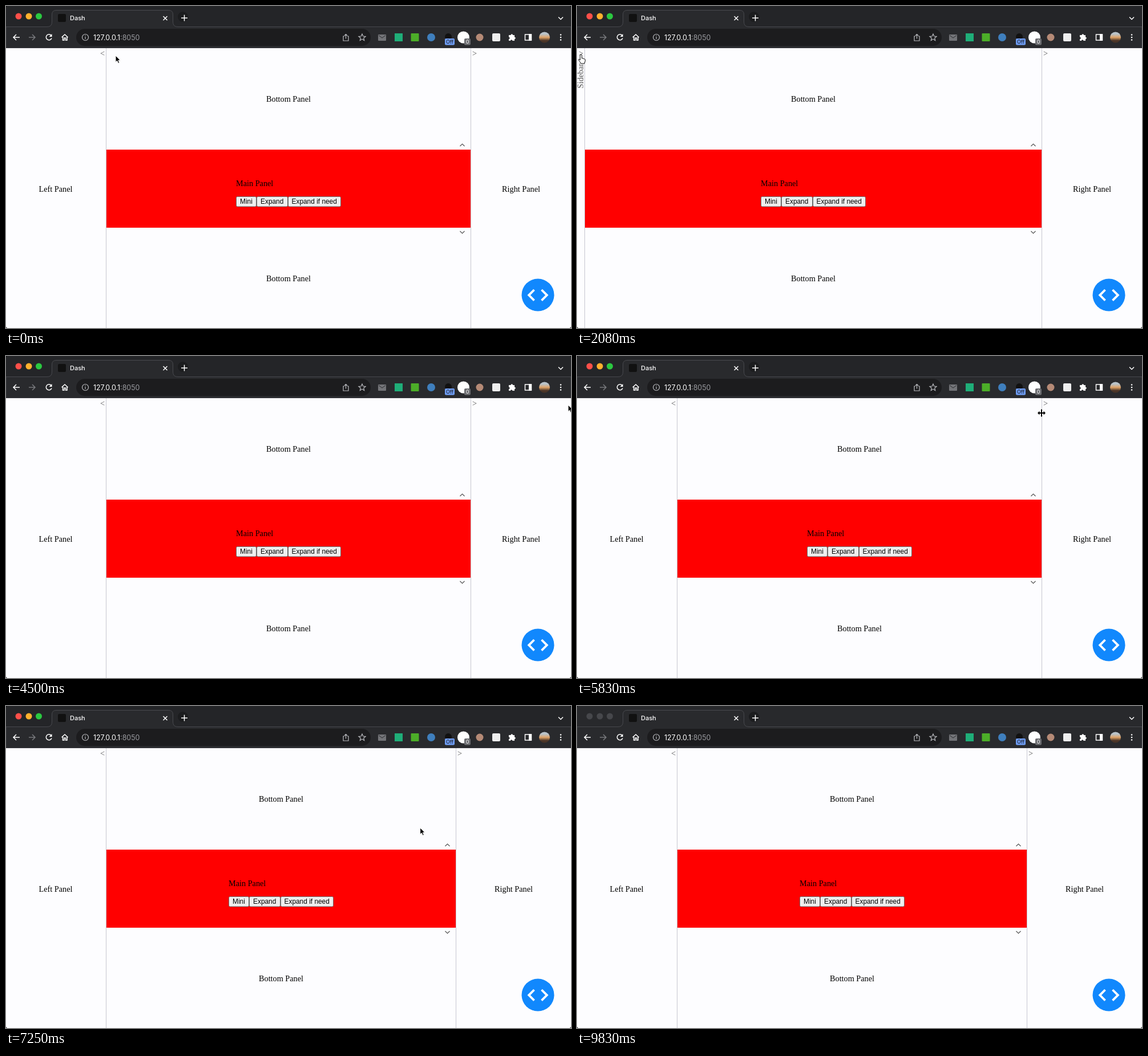
Recreate the animation shown at these times as an HTML page. Size 990 by 565 pixels, loop 9910 ms.

```html
<!DOCTYPE html>
<html lang="en">
<head>
<meta charset="utf-8">
<title>Resizable panels</title>
<style>
html, body { margin: 0; width: 100%; height: 100%; overflow: hidden; background: #000; }
svg { display: block; border-radius: 3px; }
text { white-space: pre; }
.ui { font-family: Inter, Roboto, sans-serif; fill: #fff; }
.page { font: 14.25px "Liberation Serif", "Times New Roman", serif; }
.button { font: 11.9px "Liberation Sans", Arial, sans-serif; }
.button rect { fill: #efefef; stroke: #6b6b6b; }
.grey { fill: #555; }
.line { fill: none; stroke: #fff; stroke-width: 1.5; }
.chevron { fill: none; stroke: #555; stroke-width: 1.2; }
.edge { stroke: #c6c6d0; }
.middle { text-anchor: middle; }
</style>
</head>
<body>
<svg width="990" height="565" viewBox="0 0 990 565">
  <defs>
    <linearGradient id="photo" x2="0" y2="1">
      <stop offset=".2" stop-color="#b9c3c9"/><stop offset=".5" stop-color="#e0a468"/><stop offset=".8" stop-color="#4a3426"/>
    </linearGradient>
  </defs>

  <!-- Tab strip -->
  <rect id="strip" width="990" height="37"/>
  <g id="lights"><circle cx="22" cy="18" r="5.5"/><circle cx="40" cy="18" r="5.5"/><circle cx="57.500" cy="18" r="5.500"/></g>
  <path d="M0 36.500H72Q80.500 36.500 80.500 28V15Q80.500 7.500 88 7.500H285Q292.500 7.500 292.500 15V28Q292.500 36.500 301 36.500H990V74H0Z" fill="#292a2d" stroke="#48494e"/>
  <rect x="91" y="14" width="14" height="14" rx="2" fill="#111"/>
  <text class="ui" x="112" y="25" font-size="11" font-weight="500">Dash</text>
  <circle cx="310" cy="19" r="9" fill="#1b1c1e"/>
  <path class="line" d="M275.500 18l7 7m0-7l-7 7M307 21h11M312.500 15.500v11M968 19.500l4 4 4-4"/>

  <!-- Toolbar -->
  <path class="line" d="M24 55H13m5-5l-5 5 5 5M79.500 52A5 5 0 1 0 80 56.500M97.500 55l5.500-5 5.500 5M99.500 54v6h2.500v-4h2.500v4h2.500v-6"/>
  <path d="M80.500 49v5h-5z" fill="#fff"/>
  <path class="line" d="M40 55h11m-5-5l5 5-5 5" style="stroke:#77787c"/>
  <rect x="123" y="40" width="516" height="30" rx="15" fill="#1c1c1e"/>
  <g class="line" style="stroke:#bbbcc0;stroke-width:1.2">
    <circle cx="139" cy="55" r="5.500"/><path d="M139 54v4M139 51.500v1.300"/>
    <path d="M593 53h-2v8h9v-8h-2M595.500 57.500v-8m-2.500 2.500l2.500-2.500 2.500 2.500"/>
    <path d="M624 49l1.700 4 4.300.4-3.300 2.800 1 4.200-3.700-2.300-3.700 2.300 1-4.200-3.300-2.800 4.300-.4z"/>
  </g>
  <text class="ui" x="153" y="59.500" font-size="12.400">127.0.0.1<tspan fill="#9a9ba0">:8050</tspan></text>
  <rect x="652" y="50" width="14" height="11" rx="1" fill="#737478"/>
  <path d="M653 51.500l6 4.500 6-4.500" fill="none" stroke="#292a2d"/>
  <rect x="681" y="48" width="14" height="14" fill="#1fae78"/>
  <rect x="709.500" y="48" width="14" height="14" rx="1" fill="#4cae28"/>
  <circle cx="745" cy="55" r="7" fill="#3f7fbd"/>
  <circle cx="775" cy="54" r="6" fill="#111"/>
  <circle cx="801.500" cy="55" r="10.500" fill="#fff"/>
  <rect x="769" y="57" width="17" height="11.500" rx="2" fill="#6f9df5"/>
  <rect x="803" y="57" width="11" height="11.500" rx="2" fill="#6b6c70"/>
  <g class="ui middle" font-size="9"><text x="777.500" y="66" style="fill:#111">Off</text><text x="808.500" y="66">0</text></g>
  <circle cx="830" cy="55" r="6.500" fill="#b58a76"/>
  <rect x="852" y="48" width="14" height="14" rx="2" fill="#eee"/>
  <path d="M881 51h3.500a1.800 1.800 0 0 1 3.600 0H891v3.500a1.800 1.800 0 0 1 0 3.600V61h-3.500a1.800 1.800 0 0 0-3.600 0H881v-3a1.800 1.800 0 0 0 0-3.600z" fill="#fff"/>
  <path class="line" d="M909.500 50h11v10h-11z"/>
  <path d="M916 49h5v12h-5z" fill="#fff"/>
  <circle cx="943.500" cy="55" r="9.500" fill="url(#photo)"/>
  <g fill="#fff"><circle cx="972" cy="50.500" r="1.300"/><circle cx="972" cy="55" r="1.300"/><circle cx="972" cy="59.500" r="1.300"/></g>

  <!-- Page -->
  <g class="page">
    <rect y="74" width="990" height="491" fill="#fdfdff"/>
    <rect id="red" y="252" height="137" fill="#f00"/>
    <g id="main">
      <text class="middle" x="495" y="168">Bottom Panel</text>
      <text x="403" y="316">Main Panel</text>
      <g class="button">
        <rect x="403.500" y="334.500" width="35" height="17.500" rx="2"/><text x="410" y="347">Mini</text>
        <rect x="439.500" y="334.500" width="54" height="17.500" rx="2"/><text x="446" y="347">Expand</text>
        <rect x="494.500" y="334.500" width="92" height="17.500" rx="2"/><text x="500.500" y="347">Expand if need</text>
      </g>
      <text class="middle" x="495" y="483">Bottom Panel</text>
    </g>
    <g id="leftEdge">
      <path class="edge" d="M-.5 74V565"/>
      <text id="leftToggle" class="grey" x="-11" y="88"></text>
    </g>
    <g id="rightEdge">
      <path class="edge" d="M.5 74V565"/>
      <path class="chevron" d="M-18.500 246l4-4 4 4M-18.500 395l4 4 4-4"/>
      <text id="rightToggle" class="grey" x="3" y="88"></text>
    </g>
    <text id="leftName" class="middle" y="325.500">Left Panel</text>
    <text id="rightName" class="middle" y="325.500">Right Panel</text>
    <text id="leftBar" class="grey" transform="translate(11 144.500) rotate(-90)">Sidebar</text>
    <text id="rightBar" class="grey" transform="translate(988 144.500) rotate(-90)">Sidebar</text>
    <circle cx="932" cy="507" r="28.500" fill="#1188fd"/>
    <path d="M925.500 498l-9.300 9.300 9.300 9.300M938.500 498l9.300 9.300-9.300 9.300" fill="none" stroke="#fff" stroke-width="3.800"/>
  </g>

  <g id="cursor">
    <path id="arrow" d="M0 0V11.500L2.700 9.100 4.600 13.500 6.700 12.600 4.800 8.300H8.300Z" fill="#000" stroke="#fff"/>
    <path id="hand" d="M-1.600.8a1.600 1.600 0 0 1 3.200 0V6q1.200-1 2.200.4 1.500-.6 2 .7 1.800-.2 1.600 1.600 0 3-1.500 6.300h-6Q-2.400 11-4.400 8.600q0-1.800 1.600-1L-1.600 9z" fill="#fff" stroke="#000"/>
    <path id="resize" d="M-7 0l3.500-3.500V-1H-1V-6.500H1V-1H3.500V-3.500L7 0 3.500 3.500V1H1V6.500H-1V1H-3.500V3.500Z" fill="#000" stroke="#fff" stroke-width="1.400" paint-order="stroke"/>
  </g>
</svg>
<script>
const LOOP = 9910, STEP = 1000 / 12;
const $ = id => document.getElementById(id);

// Keys hold a tick (1/12 s) and values to pass through.
const pointer = [
  [0, 192, 87, 'arrow'], [4, 192, 87, 'arrow'], [9, 169, 84, 'hand'], [12, 169, 82, 'hand'], [14, 169, 81, 'arrow'],
  [16, 169, 81, 'arrow'], [18, 28, 96, 'arrow'], [20, 28, 96, 'arrow'], [24, 9, 88, 'hand'], [25, 7, 86, 'hand'],
  [28, 7, 87, 'arrow'], [30, 7, 87, 'arrow'], [31, 821, 105, 'arrow'], [33, 821, 105, 'arrow'],
  [35, 843, 98, 'arrow'], [37, 821, 87, 'hand'], [38, 821, 85, 'hand'],
  [40, 821, 84, 'arrow'], [41, 821, 83, 'arrow'], [47, 983, 89, 'hand'], [48, 985, 88, 'hand'], [49, 985, 88, 'hand'],
  [52, 985, 86, 'hand'], [54, 985, 86, 'arrow'], [65, 815, 99, 'arrow'], [66, 814, 100, 'resize'],
  [71, 814, 100, 'resize'], [75, 905, 106, 'resize'], [79, 905, 106, 'resize'], [80, 828, 108, 'resize'],
  [83, 789, 112, 'resize'], [84, 789, 112, 'resize'], [85, 789, 105, 'arrow'], [86, 789, 105, 'arrow'],
  [89, 599, 431, 'arrow'], [92, 599, 431, 'arrow'], [96, 704, 408, 'arrow'], [101, 704, 408, 'arrow'],
  [102, 855, 475, 'arrow'], [104, 920, 512, 'hand'], [107, 940, 540, 'arrow'], [108, 943, 542, 'arrow']
];
const drag = [[71, 814], [75, 903], [79, 903], [80, 847], [83, 788]];

function sample(keys, n) {
  let i = keys.findIndex(key => key[0] > n);
  if (i < 0) i = keys.length;
  const a = keys[Math.max(i - 1, 0)], b = keys[Math.min(i, keys.length - 1)];
  const u = b[0] > a[0] ? (n - a[0]) / (b[0] - a[0]) : 0;
  return a.slice(1).map((v, k) => typeof v === 'number' ? v + (b[k + 1] - v) * u : v);
}

const move = (id, x, y = 0) => $(id).setAttribute('transform', `translate(${x} ${y})`);
const show = (id, on) => $(id).setAttribute('visibility', on ? 'visible' : 'hidden');

function draw(n) {
  const leftShut = n >= 13 && n < 28, rightShut = n >= 40 && n < 54, inactive = n >= 118;
  const left = leftShut ? 14 : 176;
  const right = rightShut ? 976 : Math.round(sample(drag, n)[0]);

  $('red').setAttribute('x', left);
  $('red').setAttribute('width', right - left);
  move('main', (left + right) / 2 - 495);
  move('leftEdge', left);
  move('rightEdge', right);
  $('leftToggle').textContent = leftShut ? '>' : '<';
  $('rightToggle').textContent = rightShut ? '<' : '>';
  $('leftName').setAttribute('x', left / 2 - 1);
  $('rightName').setAttribute('x', (right + 990) / 2 + .5);
  show('leftName', !leftShut);
  show('rightName', !rightShut);
  show('leftBar', leftShut);
  show('rightBar', rightShut);

  $('strip').setAttribute('fill', inactive ? '#28292c' : '#242528');
  ['#ff4f49', '#ffb02d', '#2bc840'].forEach((color, i) =>
    $('lights').children[i].setAttribute('fill', inactive ? '#46474b' : color));

  const [x, y, kind] = sample(pointer, n);
  move('cursor', x, y);
  for (const name of ['arrow', 'hand', 'resize']) show(name, name === kind && !inactive);
}

const start = performance.now();
function tick() {
  const t = (performance.now() - start) % LOOP;
  draw(Math.floor((t + 4) / STEP));
  requestAnimationFrame(tick);
}
tick();
</script>
</body>
</html>
```
